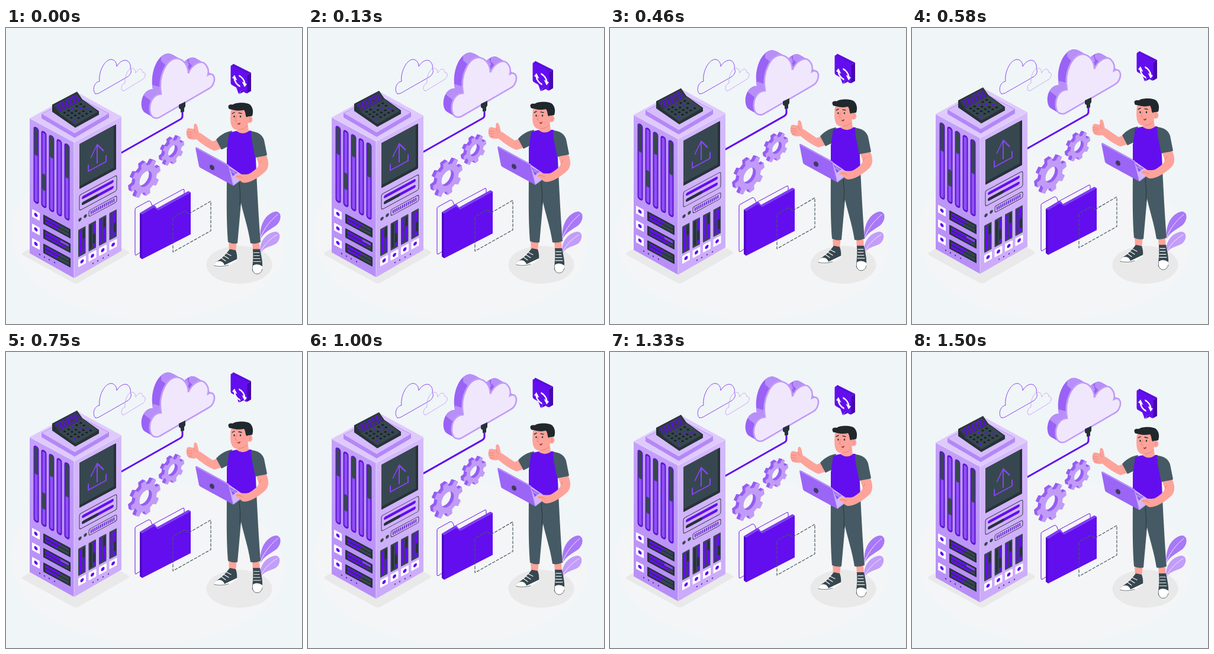
Animation, 500 px wide and 500 px high, one loop 1.54 s. Source, as an HTML page:

```html
<!DOCTYPE html>
<html lang="en">
<head>
<meta charset="utf-8">
<title>Cloud server</title>
<style>
html, body { margin: 0; width: 100%; height: 100%; overflow: hidden; background: #f0f5f8; }
svg { display: block; width: 100vw; height: 100vh; }
.line { fill: none; stroke-linecap: round; stroke-linejoin: round; }
.main { fill: #630eef; }
.dark { fill: #263238; }
.slate { fill: #455a64; }
.skin { fill: #fda39a; }
.white { fill: #fff; }
</style>
</head>
<body>
<svg viewBox="0 0 500 500" xmlns="http://www.w3.org/2000/svg">
<defs>
  <path id="puff" d="M250 152C238 148 240 113 262 112C256 80 273 49 290 52C301 54 308 65 308 77C314 62 329 54 336 61C341 66 343 73 341 80C350 75 355 84 350 95C348 100 345 102 341 104L260 151C257 153 253 153 250 152Z"/>
  <clipPath id="lit"><path d="M230 112L250 127L264 102L232 92ZM262 56L282 74L309 64L300 35L262 38ZM309 58L320 69L352 84L350 40L310 40Z"/></clipPath>
  <linearGradient id="wallL" x2="0" y2="1"><stop stop-color="#c5a1f9"/><stop offset="1" stop-color="#b68df7"/></linearGradient>
  <linearGradient id="wallR" x2="0" y2="1"><stop stop-color="#d5bafb"/><stop offset="1" stop-color="#cbaafa"/></linearGradient>
</defs>

<!-- ground -->
<path d="M9 345C9 270 110 215 240 215C330 215 395 253 430 288C470 325 480 368 464 400C440 450 350 493 245 493C110 493 9 430 9 345Z" fill="#f4f5f6"/>
<path d="M29 379L112 332Q118 329 124 332L206 377Q210 380 206 382L123 430Q118 433 113 430L29 384Q25 381 29 379Z" fill="#e9e9ea"/>
<ellipse cx="394" cy="400" rx="55.5" ry="32" fill="#e9e9ea"/>

<!-- distant clouds -->
<g class="line">
  <path d="M151 111C146 108 147 92 158 90C156 75 166 53 178 53C184 54 187 59 187 65C192 56 201 52 206 56C210 60 211 64 210 69C213 72 211 78 206 82L157 110Q153 112 151 111Z" stroke="#8744f3"/>
  <path d="M197 106C193 104 195 95 201 93C200 82 206 68 213 68C218 68 219 73 219 76C223 69 230 66 231 75C237 75 236 82 232 86L201 105Q198 107 197 106Z" stroke="#c9aaf9"/>
</g>

<!-- plant -->
<path d="M430 356C427 332 440 312 456 310C467 311 465 326 457 333C446 341 437 344 430 356Z" fill="#a878f6"/>
<path d="M430 380C426 362 440 345 456 344C466 346 463 360 455 365C444 370 436 371 430 380Z" fill="#c29df9"/>
<path class="line" d="M430 354C436 338 446 326 459 315M430 378C436 366 446 356 458 349" stroke="#f1e8fe"/>

<g id="float">
  <!-- cable and cloud -->
  <path class="line" d="M298 140V149.500Q298 152.500 295 154.500L190 214" stroke="#630eef" stroke-width="3"/>
  <g id="cloudSide" fill="#9a62f5"></g>
  <g id="cloudTop" fill="#b88ff8" clip-path="url(#lit)"></g>
  <use href="#puff" fill="#f0e7fd" stroke="#c09bf8" stroke-width="2.6"/>
  <path class="dark" d="M292 130L303 125V133L301 136V142L295 143V138L292 136Z"/>

  <g id="gears"></g>

  <!-- folder -->
  <path class="line" d="M226 380L220 384Q218 385 218 382V307Q218 305 220 304L240 293Q244 292 245 296L247 301L299 273Q301 272 301 275V283" stroke="#630eef"/>
  <path d="M226 313L230 315V391L226 388Z" fill="#4f0bc4"/>
  <path d="M226 313L246 301L251 300L255 305L308 276L312 278L257 308L250 303L230 315Z" fill="#7d3bf3"/>
  <path class="main" d="M230 315L250 303L257 308L312 278V349L230 391Z"/>
  <path class="line" d="M282 323V379L346 343V293L308 315L303 309L287 318Q282 320 282 323Z" stroke="#455a64" stroke-width="1.2" stroke-dasharray="4.5 3"/>

  <!-- server -->
  <path d="M40 153L120 109L195 150L115 193.5Z" fill="#dfcafc"/>
  <path d="M40 153L115 193.5V423L40 381Z" fill="url(#wallL)"/>
  <path d="M115 193.5L195 150V377L115 423Z" fill="url(#wallR)"/>
  <path class="line" d="M40 153L115 193.5L195 150M115 193.5V423" stroke="#e9dbfd" stroke-width=".8"/>
  <path d="M60 146L118 116L174 145V152L116 186L60 153Z" fill="#b388f7"/>
  <path d="M60 146L118 116L174 145L116 179Z" fill="#d6bcfb" stroke="#a97af6" stroke-width=".6"/>
  <path class="dark" d="M78 130L120 108L129 121L157 141V147L117 169L78 142Z"/>
  <path d="M80 131L119 110L128 122L89 144Z" fill="#303c43"/>
  <path class="line" d="M84 132L98 124.500M102 122.500L118 114M86 135L120 116.500M89 137.500L110 126M114 124L123 119M91 140.500L125 122" stroke="#630eef" stroke-width="1.5"/>
  <path d="M89 144L129 122L155 142L117 164Z" fill="#37474f"/>
  <g id="keys"></g>
  <g id="left" transform="matrix(1 .54 0 1 40 153)"></g>
  <g id="right" transform="matrix(1 -.54 0 1 115 193.5)"></g>

  <!-- far arm -->
  <path class="skin" d="M360 188L349 192Q337 184 327 177L321 188Q337 202 352 208L368 203Z"/>
  <path class="skin" d="M306 171C309 168 314 171 317 171C318 167 316 163 320 162C324 163 324 172 326 177L328 186C322 190 312 190 308 187C304 183 304 175 306 171Z"/>
  <path class="line" d="M306 176L314 177M306 180L314 181M308 185L314 185M318 172Q318 176 322 178" stroke="#e57f78" stroke-width=".8"/>
  <path class="slate" d="M382 174C370 176 361 182 355 189L364 206L376 200Z"/>

  <!-- legs -->
  <path class="skin" d="M376 360H390L388 378H377ZM416 362H428L429 378H417Z"/>
  <path class="slate" d="M373 240L423 246C425 285 427 325 430 362Q421 366 413 364C409 338 401 315 397 296L391 364Q383 366 375 362C372 320 373 290 373 240Z"/>
  <path class="line" d="M394 262Q397 282 395 300" stroke="#263238" stroke-width=".9"/>
  <path d="M378 374L388 376Q391 384 390 392L376 401Q362 406 353 402Q351 398 356 395C365 390 372 382 378 374ZM417 374H429C431 385 434 395 433 407Q431 416 424 416Q416 415 416 406C417 395 418 385 417 374Z" fill="#37474f"/>
  <path class="white" d="M356 395Q366 392 369 401L390 391V393L376 402Q362 407 353 403Q350 399 356 395ZM417 402Q424 397 433 403Q434 416 424 416.500Q415 416 417 402Z"/>
  <path class="line" d="M364 389L371 394M368 385L376 390M372 381L380 385M418 395H430M418 390H429M419 385H428M419 380H428" stroke="#fff" stroke-width="1.2"/>
  <path class="line" d="M352 402Q364 405 376 401M416 408Q418 416 424 416Q431 416 433 408" stroke="#263238" stroke-width=".7"/>

  <!-- body -->
  <path class="main" d="M377 178Q384 175 391 174H414L420 178L423 246Q400 251 373 243V205Z"/>
  <path class="skin" d="M391 164L408 159L410 175Q400 182 390 175Z"/>
  <path class="slate" d="M414 175C426 176 433 181 436 190L441 215Q431 221 421 219L415 190Z"/>
  <path class="skin" d="M380 140C378 156 379 169 387 172C396 175 404 171 408 164L412 148L405 132L385 133Z"/>
  <ellipse class="skin" cx="411.500" cy="155" rx="4.800" ry="6"/>
  <path d="M376 135C374 131 378 129 383 130C388 126 401 126 408 128C416 130 419 140 416 149L411 150C409 149 408 151 406 151C404 147 405 143 402 139C395 141 387 140 380 138Q376 138 376 135Z" fill="#20282d"/>
  <path class="line" d="M382 145L386 143M393 144L398 145" stroke="#20282d" stroke-width="1.300"/>
  <ellipse class="dark" cx="385.500" cy="150" rx="1.200" ry="1.700"/>
  <ellipse class="dark" cx="396" cy="150" rx="1.200" ry="1.700"/>
  <path class="line" d="M390 149L387 157L390 158M411 152Q414 155 411 158M394 172Q402 172 407 166" stroke="#e57f78" stroke-width=".9"/>
  <path d="M390 161Q393 162.500 396 160Q396 164 392.500 164Z" fill="#a5413e"/>

  <!-- laptop and near arm -->
  <path d="M375 232L401 250V254L384 267Z" fill="#d3b7fb"/>
  <path d="M377 236L391 245L383 251Z" fill="#8d57ee"/>
  <path class="line" d="M379 237L388 249M383 239L389 247M378 241L384 245" stroke="#e6d8fd" stroke-width=".7"/>
  <path d="M320 203Q321 201 324 203L375 231Q377 232 377 234L384 267L329 237Q327 236 326 234Z" fill="#9b65f6"/>
  <path class="line" d="M321 203L376 233L384 266L400 254" stroke="#c6a4fa" stroke-width="1.200"/>
  <ellipse cx="348" cy="236" rx="3.600" ry="4.800" transform="rotate(-35 348 236)" fill="#40395f"/>
  <path class="skin" d="M423 219L440 216C444 226 445 236 438 243C425 255 412 262 402 262C395 261 396 256 389 254Q386 252 389 249C398 246 406 250 412 246C420 241 426 236 427 231Z"/>
  <path class="line" d="M390 251Q396 251 400 254M427 231L431 225" stroke="#e57f78" stroke-width=".9"/>
</g>

<g id="bubble">
  <path d="M380 66L384 62L414 77L407 81Z" fill="#5a0ddb"/>
  <path d="M407 81L414 77V108L407 112Z" fill="#4508b0"/>
  <path d="M398 107L402 109L394 113Z" fill="#4508b0"/>
  <path class="main" d="M379.500 67Q379.500 63 383 65L405 77Q407.500 78 407.500 81V110Q407 113 404 111L398 107L393 113L389 102L382 98Q379.500 97 379.500 94Z"/>
</g>
<g id="sync">
  <g id="arrows" transform="matrix(1 .5 0 1 394.500 90.500)"></g>
</g>
</svg>
<script>
const $ = id => document.getElementById(id);
const add = (id, html) => $(id).insertAdjacentHTML('beforeend', html);
const rect = (x, y, w, h, fill, rx = 0, more = '') =>
  `<rect x="${x}" y="${y}" width="${w}" height="${h}" rx="${rx}" fill="${fill}" ${more}/>`;
const dot = (x, y, r, fill) => `<circle cx="${x}" cy="${y}" r="${r}" fill="${fill}"/>`;
const MAIN = '#630eef', DARK = '#263238', SLATE = '#37474f', MID = '#8645f3';

// Cloud thickness
for (let i = 14; i > 0; i--) {
  const copy = `<use href="#puff" x="${-i}" y="${-i * .58}"/>`;
  add('cloudSide', copy);
  add('cloudTop', copy);
}

// Gears
function gearPath(R, r, hole, teeth) {
  const step = 2 * Math.PI / teeth, pts = [];
  for (let i = 0; i < teeth; i++)
    for (const [k, q] of [[-.3, r], [-.2, R], [.2, R], [.3, r]]) {
      const a = (i + k - .2) * step;
      pts.push((q * Math.cos(a)).toFixed(2) + ' ' + (q * Math.sin(a)).toFixed(2));
    }
  return `M${pts.join('L')}ZM${hole} 0A${hole} ${hole} 0 1 0 ${-hole} 0A${hole} ${hole} 0 1 0 ${hole} 0Z`;
}
function gear(x, y, R) {
  const d = gearPath(R, R * .76, R * .42, 8);
  for (let i = 5; i >= 0; i--)
    add('gears', `<path d="${d}" fill-rule="evenodd" fill="${i ? '#965df4' : '#c19bf8'}"
      transform="matrix(.96 -.52 0 1.12 ${x - i} ${y - i * .5})"/>`);
}
gear(236, 255.5, 26);
gear(282, 208.5, 20);

// Keypad
for (let i = 0; i < 5; i++)
  for (let j = 0; j < 4; j++)
    add('keys', `<ellipse cx="${99 + 6.8 * i + 5.6 * j}" cy="${143.500 - 3.6 * i + 4.2 * j}" rx="2.300" ry="1.500"
      fill="${(i * 3 + j * 2) % 5 == 1 ? MAIN : '#172025'}"/>`);

// Sync arrows
for (const turn of [0, 180])
  add('arrows', `<g transform="rotate(${turn})">
    <path d="M1 8.500A8.500 8.500 0 0 1 -8.500 0" fill="none" stroke="#fff" stroke-width="3"/>
    <path class="white" d="M-12.500 1L-8.500 -6L-4 1Z"/></g>`);

// Left wall
[[0, 46], [70, 28], [0, 36], [0, 0], [0, 56]].forEach(([y, h], i) => {
  const x = 6.500 + 13 * i;
  add('left', rect(x, 9, 9, 129, '#5a15cf', 4.500) + rect(x + 2, 12, 5, 123, '#8f50f5', 2)
    + (h ? rect(x + 1.500, 11 + y, 6, h, SLATE, 2.500) : ''));
});
for (let i = 0; i < 3; i++) {
  const y = 150 + 24.500 * i;
  add('left', rect(4, y + 1, 13, 13, '#fff', 1) + dot(10.500, y + 7.500, 3, MAIN)
    + rect(23, y, 46, 16, DARK, 1) + rect(26, y + 3, 40, 4, i == 1 ? MID : SLATE)
    + rect(26, y + 3, 26, 4, MAIN) + rect(26, y + 9, 40, 4, SLATE) + rect(26, y + 9, 21 + i % 2 * 12, 4, MAIN));
}
for (const x of [17, 25, 33, 42]) add('left', dot(x, 221, 1.100, '#4b1a93'));

// Right wall
add('right', rect(9, 8, 62, 76, DARK, 1) + rect(9, 8, 58, 71, SLATE)
  + `<path class="line" d="M39 56V25M28.500 41L39 25L49.500 41M24 52V62H54V52" stroke="${MID}" stroke-width="2"/>`
  + rect(9, 94.500, 63, 26, 'none', 3, `stroke="${DARK}" stroke-width=".9"`)
  + rect(13, 99, 54, 5, MAIN, 2.500) + rect(13, 109, 54, 5, MAIN, 2.500) + rect(13, 109, 28, 5, DARK, 2.500)
  + dot(10, 136, 2.800, SLATE) + dot(19, 135, 2.800, SLATE)
  + rect(25, 129, 47, 10.500, 'none', 3, `stroke="${DARK}" stroke-width=".9"`));
for (let i = 0; i < 13; i++) add('right', rect(28 + 3.200 * i, 131.500, 1.700, 5.500, '#5b21c4'));
[7, 24.500, 42, 59.500].forEach((x, i) => {
  add('right', rect(x, 152, 12.500, 46, SLATE, 1) + rect(x + 2, 155, 3.500, 40, i == 1 ? DARK : MAIN)
    + rect(x + 7.500, 155, 3.500, 40, MAIN) + rect(x + 7.500, 155 + i % 2 * 18, 3.500, 16, DARK)
    + rect(x, 202, 13, 13, '#fff', 1) + dot(x + 6.500, 208.500, 3, MAIN));
});
for (const x of [32, 40, 49, 58]) add('right', dot(x, 222, 1.100, '#4b1a93'));

// Everything bobs on one stepped triangle wave
const LOOP = 1540, STEPS = 37;
const lift = (id, y) => $(id).setAttribute('transform', `translate(0 ${-y.toFixed(3)})`);
function draw(now) {
  const step = Math.floor((now % LOOP + 5) * STEPS / LOOP) % STEPS;
  const rise = 1 - Math.abs(2 * (step + 1) / STEPS - 1);
  lift('float', 9.500 * rise);
  lift('sync', 19 * rise);
  lift('bubble', 28.500 * rise);
}
const start = performance.now();
function tick() {
  draw(performance.now() - start);
  requestAnimationFrame(tick);
}
tick();
</script>
</body>
</html>
```
